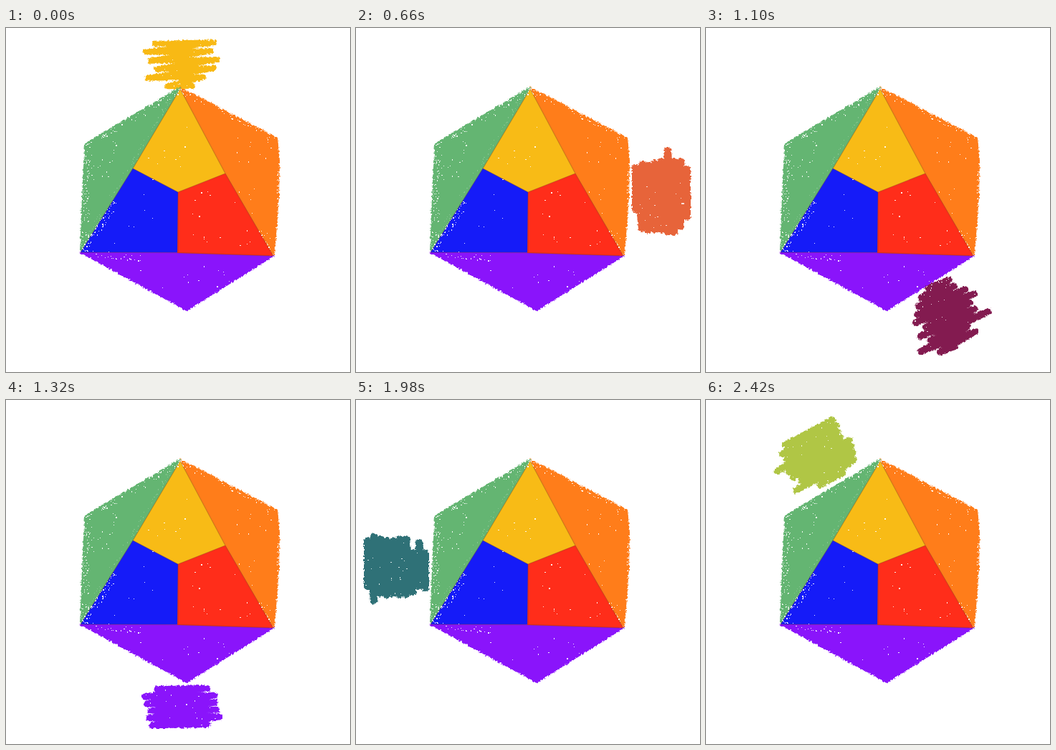
These frames come from a looping animation (480x480 px, 2.64 s). An HTML page:

```html
<!DOCTYPE html>
<html lang="en">
<head>
<meta charset="utf-8">
<title>Colour wheel</title>
<style>
html, body { margin: 0; width: 100%; height: 100%; overflow: hidden; background: #fff; }
svg { display: block; width: 100vw; height: 100vh; }
</style>
</head>
<body>
<svg id="stage" viewBox="0 0 480 480">
  <filter id="rough" filterUnits="userSpaceOnUse" x="0" y="0" width="480" height="480" color-interpolation-filters="sRGB">
    <feTurbulence type="fractalNoise" baseFrequency=".35" numOctaves="2" seed="4" result="grain"/>
    <feDisplacementMap in="SourceGraphic" in2="grain" scale="5" xChannelSelector="R" yChannelSelector="G"/>
  </filter>
</svg>
<script>
const STEP = 220;
const stage = document.getElementById('stage');

let seed = 7;
const rand = () => (seed = seed * 16807 % 2147483647) / 2147483647;
const spread = n => (rand() * 2 - 1) * n;

function add(parent, tag, attrs) {
  const node = document.createElementNS('http://www.w3.org/2000/svg', tag);
  for (const key in attrs) node.setAttribute(key, attrs[key]);
  return parent.appendChild(node);
}

const dot = (x, y) => {
  const w = rand() < .2 ? 2 : 1, h = rand() < .2 ? 2 : 1;
  return `M${Math.round(x)} ${Math.round(y)}h${w}v${h}h${-w}z`;
};
const dots = (parent, d, fill, opacity = 1) =>
  add(parent, 'path', { d, fill, opacity, 'shape-rendering': 'crispEdges' });

// Random chalk spans for one patch of parallel strokes
const patch = (rows, half) => Array.from({ length: rows }, (_, i) => {
  const reach = half * (i % (rows - 1) ? .92 : .72);
  return [-reach + spread(5), reach + spread(5)];
}).flat();

// Colour, centre of first stroke, angle, spacing, width, stroke ends along the angle
const scribbles = [
  ['#f8b914', 243, 21, -1, 12, 8, [-36, 47, -48, 42, -42, 51, -33, 46, -46, 31, -18, 16]],
  ['#fb9c18', 355.4, 37.8, 27, 9, 10, patch(8, 49)],
  ['#ff7d1a', 434, 121, 59, 9, 10, [-46, 43, -39, 42, -35, 46, -42, 49, -28, 37, -33, 30, -24, 22, -4, 8]],
  ['#e7643a', 462, 228, 90, 9, 10, [-31, 35, -42, 49, -42, 57, -57, 57, -42, 53, -39, 53, -37, 54, -38, 52, -33, 25]],
  ['#ff2d1a', 379.7, 328.3, -60, 9, 10, patch(8, 45)],
  ['#831b50', 322, 358, -20, 10, 9, [-13, 18, -27, 22, -34, 35, -40, 45, -46, 35, -35, 38, -46, 55, -35, 20, -53, 28, -28, -6]],
  ['#8a14fb', 245, 403, -1, 10, 9, patch(6, 52)],
  ['#4a2c85', 150, 358, 24, 9, 7.5, [-25, 52, -50, 63, -40, 67, -41, 52, -44, 65, -38, 55, -33, 61, -22, 53]],
  ['#151bf8', 98, 317.7, 75, 9, 10, patch(7, 47)],
  ['#2f7177', 97, 233, 90, 9, 10, [-19, 29, -34, 27, -20, 35, -39, 38, -39, 39, -37, 37, -37, 39, -39, 37, -42, 47, -36, 27]],
  ['#64b572', 51, 127.5, -55, 9, 10, patch(7, 48)],
  ['#b0c645', 142, 46, -28, 9, 9, [-35, 39, -45, 40, -43, 38, -63, 37, -49, 47, -47, 45, -39, 43, -52, 39, -19, 17]],
].map(([colour, x, y, angle, gap, width, ends]) => {
  const a = angle * Math.PI / 180, c = Math.cos(a), s = Math.sin(a);
  const at = (t, row) => [x + c * t - s * gap * row, y + s * t + c * gap * row];
  const group = add(stage, 'g', { visibility: 'hidden' });
  add(group, 'polyline', {
    points: ends.map((t, i) => at(t, i >> 1)).join(' '), fill: 'none', stroke: colour,
    'stroke-width': width, 'stroke-linejoin': 'round', 'stroke-linecap': 'round', filter: 'url(#rough)',
  });
  let specks = '';
  for (let i = 0; i < 22; i++) {
    const row = Math.floor(rand() * ends.length / 2);
    const from = ends[row * 2], to = ends[row * 2 + 1];
    specks += dot(...at(from + (to - from) * rand(), row + spread(.5)));
  }
  dots(group, specks, '#fff', .8);
  return group;
});

// The solid in the middle
const solid = add(stage, 'g', {});
const faces = add(solid, 'g', { filter: 'url(#rough)' });
const seamless = add(solid, 'g', {});
const face = (parent, points, fill) => add(parent, 'polygon', { points, fill });
face(faces, '243,82 110,161 107,210 103,313 180,260', '#64b572');
face(faces, '243,82 379,153 382,185 381,235 375,318 290,240', '#ff7d1a');
face(faces, '102,313 240,300 375,318 252,395', '#8a14fb');
face(seamless, '243,85 177,196 240,230 306,203', '#f8bb16');
face(seamless, '177,196 104,313 240,313 240,229', '#151bf8');
face(seamless, '240,229 306,203 373,318 239,314', '#ff2d1a');
add(seamless, 'path', {
  d: 'M243 85L177 196L104 313L240 313.5L373 318L306 203ZM177 196L240 229L306 203M240 229V313',
  fill: 'none', stroke: '#6a3a20', 'stroke-width': 1.3, opacity: .3,
});

// Bare paper showing through, thickest beside the edges: ends, count, inward depth
let bare = '';
[
  [243, 83, 110, 162, 50, 8], [110, 162, 104, 312, 80, 11], [104, 308, 150, 240, 60, -9],
  [243, 83, 379, 153, 45, -8], [379, 153, 375, 318, 50, 7], [374, 318, 252, 395, 55, 9],
  [103, 314, 252, 395, 40, -8], [120, 318, 190, 326, 24, 9], [350, 280, 374, 318, 16, 10],
].forEach(([x1, y1, x2, y2, count, depth]) => {
  const dx = x2 - x1, dy = y2 - y1, len = Math.hypot(dx, dy);
  for (let i = 0; i < count; i++) {
    const t = rand(), inset = depth * rand() ** 1.6;
    bare += dot(x1 + dx * t + dy / len * -Math.abs(inset) * Math.sign(-depth),
                y1 + dy * t - dx / len * -Math.abs(inset) * Math.sign(-depth));
  }
});
[[135, 185, 22, 28, 18], [220, 175, 35, 40, 10], [185, 262, 40, 40, 6], [300, 268, 45, 40, 20],
 [345, 180, 25, 45, 12], [255, 345, 70, 20, 12]].forEach(([x, y, w, h, count]) => {
  while (count--) bare += dot(x + spread(w), y + spread(h));
});
dots(solid, bare, '#fff', .9);

let grain = '';
for (let i = 0; i < 60; i++) {
  const t = rand();
  grain += dot(236 - 118 * t - rand() * 6, 92 + 196 * t + spread(3));
}
dots(solid, grain, '#8fcb98', .8);

let shown = scribbles[0];
function frame() {
  shown.setAttribute('visibility', 'hidden');
  shown = scribbles[Math.floor(performance.now() / STEP) % scribbles.length];
  shown.setAttribute('visibility', 'visible');
  requestAnimationFrame(frame);
}
frame();
</script>
</body>
</html>
```
